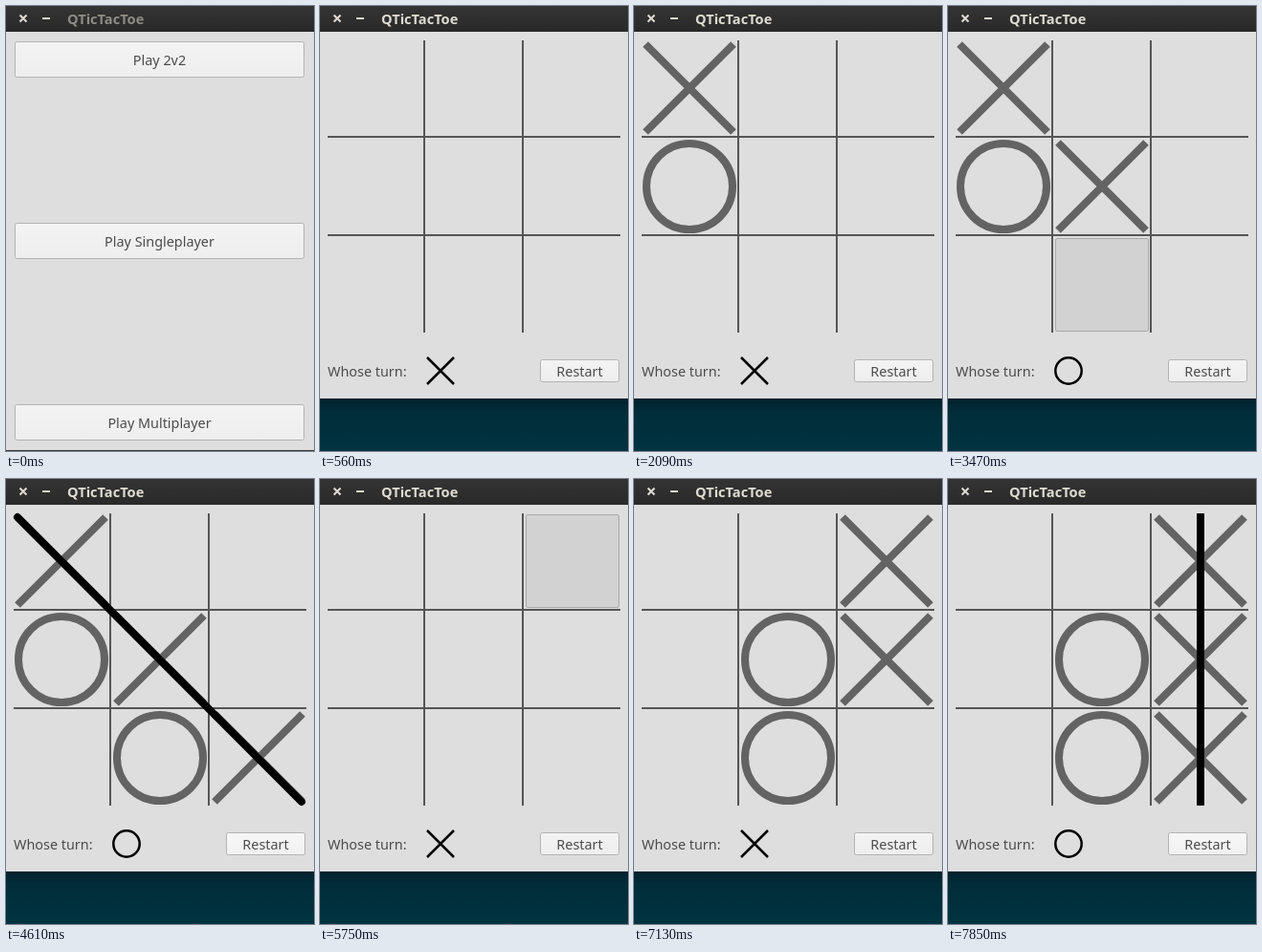
An HTML page that plays this animation: 322x466 px, repeating every 8000 ms.

```html
<!DOCTYPE html>
<html lang="en">
<head>
<meta charset="utf-8">
<title>QTicTacToe</title>
<style>
  html, body { margin: 0; width: 100%; height: 100%; overflow: hidden; background: #dedede; }
  svg { display: block; width: 100vw; height: 100vh; }
  text { font: 14.4px "Noto Sans", "Open Sans", sans-serif; fill: #4c4c4c; }
  .mid { text-anchor: middle; }
  #title { font-weight: 700; font-size: 14.6px; }
  .btn { fill: url(#face); stroke: #b3b3b3; }
  .btn.hover { fill: url(#lit); }
  .btn.down { fill: #d2d2d2; stroke: #a8a8a8; }
  .mark { fill: none; stroke: #636363; stroke-width: 8; }
  .turn { fill: none; stroke: #000; stroke-width: 2.5; }
</style>
</head>
<body>
<svg viewBox="0 0 322 466" preserveAspectRatio="none">
  <defs>
    <linearGradient id="bar" x2="0" y2="1">
      <stop stop-color="#343434"/><stop offset="1" stop-color="#292929"/>
    </linearGradient>
    <linearGradient id="face" x2="0" y2="1">
      <stop stop-color="#f3f3f3"/><stop offset="1" stop-color="#eeeeee"/>
    </linearGradient>
    <linearGradient id="lit" x2="0" y2="1">
      <stop stop-color="#f7f7f7"/><stop offset="1" stop-color="#f1f1f1"/>
    </linearGradient>
    <linearGradient id="desk" x2="0" y2="1">
      <stop stop-color="#01222c"/><stop offset=".25" stop-color="#012d39"/>
      <stop offset="1" stop-color="#003341"/>
    </linearGradient>
  </defs>
  <rect width="322" height="466" fill="#dedede"/>
  <rect width="322" height="27" fill="url(#bar)"/>
  <path d="M14.5 9.5l7 7m0-7l-7 7M38 13h8" stroke="#dfdbd2" stroke-width="2"/>
  <text id="title" x="64" y="19">QTicTacToe</text>

  <g id="menu"><rect y="465" width="322" height="1" fill="#3a3a3a"/></g>

  <g id="game">
    <rect y="411" width="322" height="55" fill="url(#desk)"/>
    <path d="M109 36V342M212 36V342M8 137H314M8 240H314" stroke="#555" stroke-width="2"/>
    <rect id="press" class="btn down" width="97" height="97" rx="1.5"/>
    <g id="marks"></g>
    <path id="win" stroke="#000" stroke-width="8"/>
    <text x="8" y="388">Whose turn:</text>
    <path id="turnX" class="turn" d="M112 368l28 28m0-28l-28 28"/>
    <circle id="turnO" class="turn" cx="126" cy="382" r="13.7"/>
    <rect id="restart" class="btn" x="230.5" y="370.5" width="82" height="23" rx="2"/>
    <text class="mid" x="271.5" y="388">Restart</text>
  </g>
</svg>
<script>
const LOOP = 8000;
const $ = id => document.getElementById(id);

// press: cell goes down, mark: symbol appears, turn: indicator flips
const move = (cell, press, mark = press + 60, turn = mark) => ({ cell, press, mark, turn });

const rounds = [
  {
    start: 560, end: 5000, hover: 4610, down: 4940,
    moves: [move(0, 1550), move(3, 2030), move(4, 2660), move(7, 3470), move(8, 4250, 4340)],
    win: { at: 4340, d: 'M12 40L309 338', cap: 'round' }
  },
  {
    start: 5000, end: LOOP, hover: 7850, down: Infinity,
    moves: [move(2, 5750, 5810, 5840), move(4, 6200), move(5, 6680), move(7, 7070), move(8, 7460, 7520, 7550)],
    win: { at: 7550, d: 'M264 36V342', cap: 'butt' }
  }
];

const show = (el, on) => el.setAttribute('display', on ? 'inline' : 'none');
const center = cell => [58 + 103 * (cell % 3), 86 + 103 * Math.floor(cell / 3)];

function markSvg(cell, i) {
  const [x, y] = center(cell);
  return i % 2
    ? `<circle class="mark" cx="${x}" cy="${y}" r="45"/>`
    : `<path class="mark" d="M${x - 46} ${y - 46}l92 92m0-92l-92 92"/>`;
}

$('menu').innerHTML += ['Play 2v2', 'Play Singleplayer', 'Play Multiplayer'].map((label, i) => {
  const y = 37.5 + 190 * i;
  return `<rect class="btn" x="9.5" y="${y}" width="302" height="37" rx="2"/>
    <text class="mid" x="160.5" y="${y + 24.5}">${label}</text>`;
}).join('');
const firstBtn = $('menu').querySelector('.btn');

let lastMarks = null;

function drawGame(t) {
  const round = rounds.find(r => t < r.end);
  const { moves, win } = round;

  const marks = moves.map((m, i) => t >= m.mark ? markSvg(m.cell, i) : '').join('');
  if (marks !== lastMarks) $('marks').innerHTML = lastMarks = marks;

  const held = moves.find(m => t >= m.press && t < m.mark);
  show($('press'), held);
  if (held) {
    const [x, y] = center(held.cell);
    $('press').setAttribute('x', x - 48.5);
    $('press').setAttribute('y', y - 48.5);
  }

  const oTurn = moves.filter(m => t >= m.turn).length % 2 === 1;
  show($('turnX'), !oTurn);
  show($('turnO'), oTurn);

  show($('win'), t >= win.at);
  $('win').setAttribute('d', win.d);
  $('win').setAttribute('stroke-linecap', win.cap);

  const hover = t >= round.hover || (t >= 5000 && t < 5240);
  const state = t >= round.down ? ' down' : hover ? ' hover' : '';
  $('restart').setAttribute('class', 'btn' + state);
}

function draw(t) {
  const playing = t >= rounds[0].start;
  show($('menu'), !playing);
  show($('game'), playing);
  $('title').style.fill = t < 500 ? '#8f8c87' : '#dfdbd2';
  firstBtn.setAttribute('class', t < 500 ? 'btn' : 'btn down');
  if (playing) drawGame(t);
}

const begin = performance.now();
function tick() {
  draw((performance.now() - begin) % LOOP);
  requestAnimationFrame(tick);
}
tick();
</script>
</body>
</html>
```
